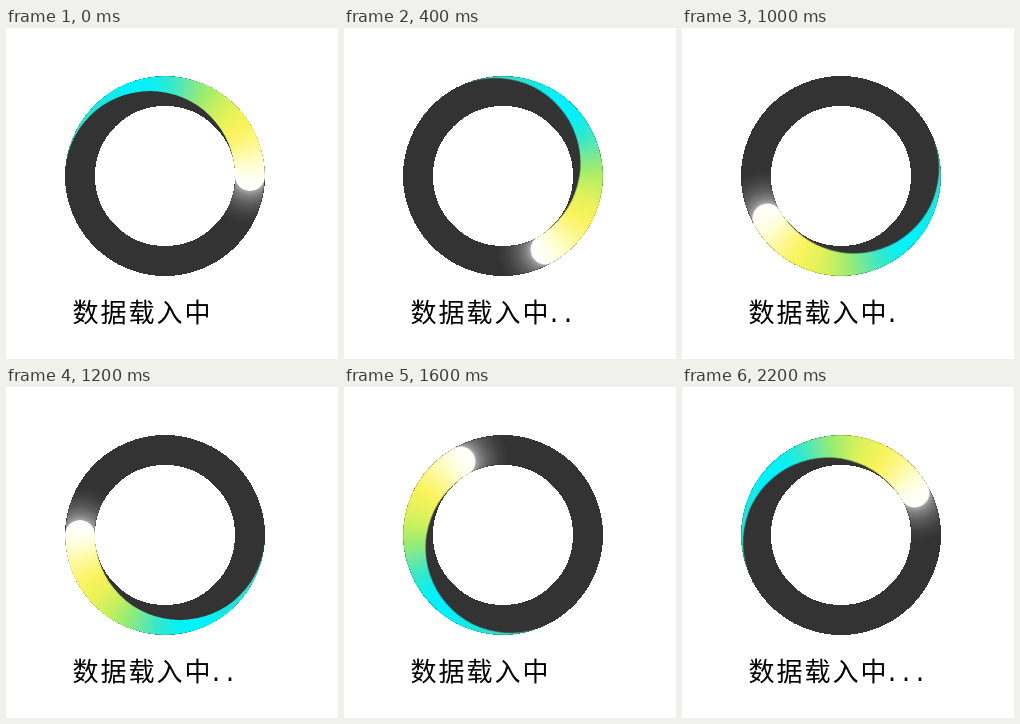
An HTML page that plays this animation: 332x331 px, repeating every 2.4 s.

```html
<!DOCTYPE html>
<html lang="zh">
<head>
<meta charset="utf-8">
<title>数据载入中</title>
<style>
  html, body {
    margin: 0;
    width: 100%;
    height: 100%;
    overflow: hidden;
    background: #fff;
  }
  .ring, .rotor {
    position: absolute;
    left: 59px;
    top: 48px;
    width: 200px;
    height: 200px;
  }
  .rotor { animation: turn 2.4s steps(12) infinite; }
  .rotor::before, .rotor::after {
    content: "";
    position: absolute;
    inset: 0;
  }
  /* soft light ahead of the head */
  .rotor::before {
    background: radial-gradient(circle at 185px 100px,
      rgba(255, 255, 255, .6) 14px, rgba(255, 255, 255, .37) 20px,
      rgba(255, 255, 255, .2) 28px, rgba(255, 255, 255, .07) 38px,
      rgba(255, 255, 255, 0) 48px);
    clip-path: path("M199.5 100A99.5 99.5 0 0 1 100 199.5V170.5A70.5 70.5 0 0 0 170.5 100Z");
  }
  /* tapering tail with a round head */
  .rotor::after {
    background: conic-gradient(from -90deg,
      #58d8a8 0deg, #40dcc0 25deg, #18e6e2 50deg, #00f2ff 68deg,
      #08f0f4 82deg, #38e8c8 95deg, #70e8a0 105deg, #9cec70 115deg,
      #c8f060 126deg, #eaf25a 138deg, #faf45e 149deg, #fdf890 160deg,
      #fffed0 172deg, #fffff0 180deg, #fff 190deg 240deg, #58d8a8 300deg);
    clip-path: path("M0 100A100 100 0 0 1 200 100A15 15 0 0 1 170 100A85 85 0 0 0 0 100Z");
  }
  .label, .dots {
    position: absolute;
    color: #000;
    white-space: pre;
  }
  .label {
    left: 66.5px;
    top: 263px;
    font: 26px/40px "Noto Sans CJK SC", "Noto Sans CJK", sans-serif;
    letter-spacing: 2px;
  }
  .dots {
    left: 203px;
    top: 273.5px;
    width: 0;
    overflow: hidden;
    font: 23.33px/28px "Liberation Mono", monospace;
    animation: count .8s steps(4) infinite;
  }
  @keyframes turn { to { transform: rotate(360deg); } }
  @keyframes count { to { width: 56px; } }
</style>
</head>
<body>
  <svg class="ring" viewBox="0 0 200 200" shape-rendering="crispEdges">
    <circle cx="100" cy="100" r="85" fill="none" stroke="#333" stroke-width="30"/>
  </svg>
  <div class="rotor"></div>
  <div class="label">数据载入中</div>
  <div class="dots">...</div>
</body>
</html>
```
